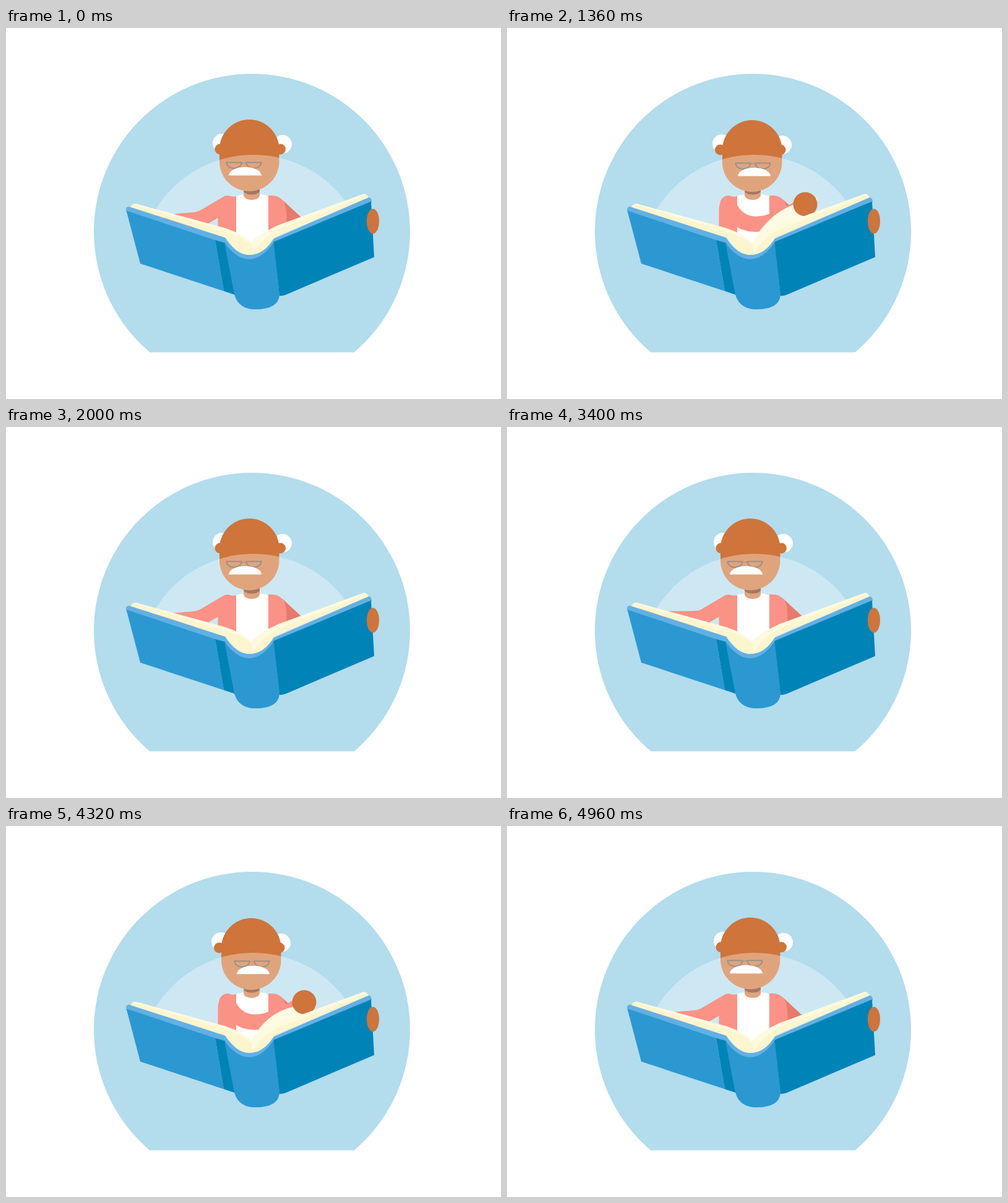
Write an HTML page that moves like this. It is 800 by 600 pixels and loops after 5 s.

```html
<!DOCTYPE html>
<html lang="en">
<head>
<meta charset="utf-8">
<title>Reading</title>
<style>
  html, body { margin: 0; width: 100%; height: 100%; overflow: hidden; background: #fff; }
  svg { display: block; width: 100vw; height: 100vh; }
</style>
</head>
<body>
<svg viewBox="0 0 800 600">
  <path d="M232.5 524.5A255.5 255.5 0 1 1 562.5 524.5Z" fill="#b3dcec"/>

  <!-- reader -->
  <g id="hair" fill="#fff">
    <circle cx="349" cy="186" r="15"/>
    <circle cx="447" cy="188" r="15"/>
  </g>
  <path d="M372 272Q384 268 398 268T424 272V345L396 360L372 345Z" fill="#fff"/>
  <path d="M384 255H410V271Q408 278 397 278T384 271Z" fill="#cf743a"/>
  <path d="M384 255H410V265Q405 269.5 397 269.5T384 265Z" fill="#78300f"/>
  <rect id="head" x="345" y="148" width="96.5" height="116" rx="48.25" fill="#cf743a"/>
  <g id="ears" fill="#cf743a">
    <circle cx="346" cy="196" r="8.5"/>
    <circle cx="443.5" cy="196" r="8.5"/>
  </g>
  <path d="M240.600 295A185.500 185.500 0 0 1 558.600 295L396 362Z" fill="#fff" opacity=".34"/>

  <g id="face">
    <g fill="none" stroke="#98928a" stroke-width="2">
      <path id="lens" d="M356.500 217.500H380.500C380 230 357 230 356.500 217.500Z"/>
      <use href="#lens" x="32"/>
      <path d="M381 219Q384.500 217 388 219" stroke-width="1"/>
    </g>
    <path d="M360 238.500C362 220.500 411 220.500 413 238.500Z" fill="#fff"/>
  </g>

  <path d="M372 272V345L342.500 332V294Q343 284 346.500 280Q349 271 359 271Q366 274 372 272Z" fill="#fb9286"/>
  <path d="M424 271Q436 270 443 275Q449 279 453 284L478 307L424 335Z" fill="#fb9286"/>
  <path d="M449 280L453 284L478 307L453 318Q455 294 449 280Z" fill="#e77a6c"/>
  <path id="arm" fill="none" stroke="#fb9286" stroke-width="25" stroke-linecap="round" stroke-linejoin="round"/>
  <circle id="hand" r="19.5" fill="#cf743a"/>
  <path id="sheet" fill="#fdfbe4"/>

  <!-- book -->
  <path d="M194 294Q194 289 199 289L354 339Q372 367 393 367Q416 367 432 341L586 274Q591 274 591 282L436 349V400H365L353 350L195 298Z" fill="#62b0e3"/>
  <path d="M201 289.500Q204 284 209 284L355 324Q382 333 396 347Q410 333 440 319L579 268Q584 269 586 274L434 338.500Q417 367 393 367Q373 367 355 339Z" fill="#fcf5cd"/>
  <path d="M396 347Q410 333 440 319L579 268L582 270L440 326Q412 341 399 365Q397 356 396 347ZM396 347Q382 333 355 324L209 284L206 285L355 329Q382 338 396 351Z" fill="#fdfae0"/>
  <path d="M194.500 295.500L338 343L352 425.500L217 381Z" fill="#2b98d2"/>
  <path d="M338 343L354 347.500L370 431.500L352 425.500Z" fill="#0084b7"/>
  <path d="M353 347Q372 374 393 374T433 346L442 432Q440 455 403 455Q376 455 369 431Z" fill="#2b98d2"/>
  <path d="M432.500 346L590 280.500L595 370.500L452 431.500Q445 434 442 433Z" fill="#0084b7"/>
  <ellipse cx="593" cy="312.500" rx="10" ry="20" fill="#cf743a"/>
</svg>
<script>
const LOOP = 5000, SECOND_TURN = 2920, STEP = 40;
const GUTTER = 396;
const el = id => document.getElementById(id);
const mix = (a, b, k) => a + (b - a) * k;
const clamp = v => Math.min(1, Math.max(0, v));
const shift = (id, x, y) => el(id).setAttribute('transform', `translate(${x} ${y})`);

// Height of the open pages' upper edge.
const pageTop = x => Math.min(284 + .274 * (x - 209), 268 + .367 * (579 - x));

function drawHead(ease) {
  const back = ease(1540, 1980);
  const turn = ease(540, 1400) - back;
  const dip = ease(440, 760) - back;
  shift('hair', -2 * turn, dip);
  shift('ears', -1.5 * turn, dip);
  shift('head', 3 * turn, dip);
  shift('face', 13 * turn, dip);
}

function drawArm(ease, hx, hy) {
  const sx = 357, sy = 284;
  const reach = ease(800, 1360) - ease(1500, 1960);
  const ex = mix(313, 384, reach), ey = mix(310, 350, reach);
  const bend = mix(.15, 1, reach);
  el('arm').setAttribute('d', `M${sx} ${sy}L${mix(ex, sx, bend)} ${mix(ey, sy, bend)}` +
    `Q${ex} ${ey} ${mix(ex, hx, bend)} ${mix(ey, hy, bend)}L${hx} ${hy}`);
  el('hand').setAttribute('cx', hx);
  el('hand').setAttribute('cy', hy);
}

// The hand carries the tip, then the sheet settles on the right page.
function drawSheet(ease, p, carriedX) {
  const settle = ease(1400, 1600);
  const tx = carriedX + 20 + 54 * settle;
  const ty = pageTop(tx) - 75 * Math.sin(Math.PI * clamp((p - 760) / 660));
  const cx = mix(336, 427, (tx - 320) / 182);
  const cy = pageTop(cx) - 38 * (ease(760, 1200) - settle);
  const fx = mix(tx, GUTTER, .06), fy = pageTop(fx) + 3;
  el('sheet').setAttribute('d',
    `M${GUTTER} 349Q${cx} ${cy} ${tx} ${ty}L${fx} ${fy}L${GUTTER} 355Z`);
  el('sheet').setAttribute('display', p > 760 && p < 1600 ? 'inline' : 'none');
  el('sheet')[p < 900 ? 'before' : 'after'](el('hand'));
}

function draw(t) {
  const p = t < SECOND_TURN ? t : t - SECOND_TURN;
  const ease = (from, to) => {
    const s = clamp((p - from) / (to - from));
    return s * s * (3 - 2 * s);
  };
  const sweep = ease(900, 1360), back = ease(1520, 2020);
  const carriedX = 222 + 82 * ease(400, 960) + 178 * sweep;
  const fidget = 3.6 * Math.sin(Math.PI * clamp((t - 140) / 120));
  const hx = mix(carriedX, 222, back) - fidget;
  const hy = mix(317 - 19 * ease(400, 600) - 13 * sweep, 317, back);

  drawHead(ease);
  drawArm(ease, hx, hy);
  drawSheet(ease, p, carriedX);
}

const start = performance.now();
function tick() {
  const t = (performance.now() - start) % LOOP;
  draw(Math.floor(t / STEP) * STEP);
  requestAnimationFrame(tick);
}
tick();
</script>
</body>
</html>
```
